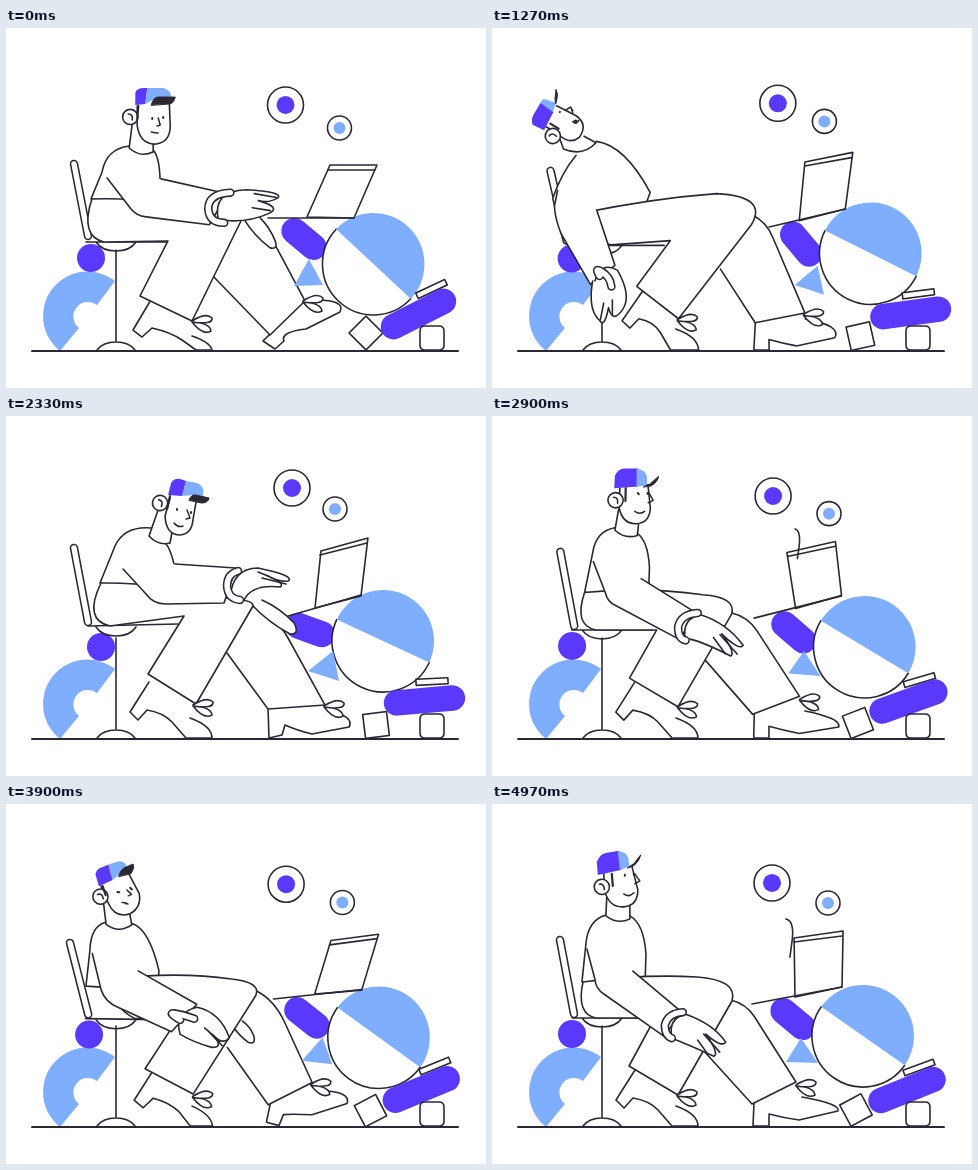
An HTML page with a canvas that plays this animation: 480x360 px, repeating every 5000 ms.

```html
<!DOCTYPE html>
<html lang="en">
<head>
<meta charset="utf-8">
<title>Napping at the laptop</title>
<style>
html, body { margin: 0; width: 100%; height: 100%; overflow: hidden; background: #fff; }
canvas { display: block; }
</style>
</head>
<body>
<canvas id="stage" width="480" height="360"></canvas>
<script>
const ctx = document.getElementById('stage').getContext('2d');
const INK = '#2b2834', PURPLE = '#5a38fc', BLUE = '#80aeff', WHITE = '#fff';
const LOOP = 5000, CYCLE = 2000;

// Phases of the six key poses: reach, type, nod off, wake, fall back, return.
const PHASES = [0, 330, 730, 970, 1470, 1830];
const COUNT = PHASES.length;
const phase = i => PHASES[(i + COUNT) % COUNT] + CYCLE * Math.floor(i / COUNT);

// Smooth periodic interpolation through the key poses.
function tween(poses, t) {
  let i = COUNT - 1;
  while (PHASES[i] > t) i--;
  const at = n => poses[(n + COUNT) % COUNT];
  const span = n => phase(n + 1) - phase(n);
  const h = span(i), u = (t - phase(i)) / h;
  return at(i).map((from, k) => {
    const rate = n => (at(n + 1)[k] - at(n)[k]) / span(n);
    const slope = n => (rate(n - 1) * span(n) + rate(n) * span(n - 1)) / (span(n - 1) + span(n));
    const to = at(i + 1)[k];
    return from + (to - from) * u * u * (3 - 2 * u)
      + h * u * (1 - u) * (slope(i) * (1 - u) - slope(i + 1) * u);
  });
}

function paint(path, { fill, line = INK, width = 1.6 } = {}) {
  if (fill) { ctx.fillStyle = fill; ctx.fill(path); }
  if (line) { ctx.strokeStyle = line; ctx.lineWidth = width; ctx.stroke(path); }
}

const NUMBER = /-?\d+(\.\d+)?/g;

// A path whose points move between six poses.
function morph(keys, ...styles) {
  const poses = keys.map(k => k.match(NUMBER).map(Number));
  return t => {
    const now = tween(poses, t);
    let i = 0;
    const path = new Path2D(keys[0].replace(NUMBER, () => now[i++].toFixed(2) + ' '));
    styles.forEach(style => paint(path, style));
  };
}

// A rigid shape that moves through [x, y, degrees] poses.
function rigid(poses, ...layers) {
  const shapes = layers.map(([d, style]) => [new Path2D(d), style]);
  return t => {
    const [x, y, turn = 0] = tween(poses, t);
    ctx.save();
    ctx.translate(x, y);
    ctx.rotate(turn * Math.PI / 180);
    shapes.forEach(([path, style]) => paint(path, style));
    ctx.restore();
  };
}

const still = (d, style) => { const path = new Path2D(d); return () => paint(path, style); };
const disc = r => `M${r} 0A${r} ${r} 0 1 1 ${-r} 0A${r} ${r} 0 1 1 ${r} 0Z`;
const solid = color => ({ fill: color, line: null });
const pill = (half, color, width) => [`M${-half} 0H${half}`, { line: color, width }];
const OUTLINE = {}, PAPER = { fill: WHITE };
const BAND = [{ width: 8.5 }, { line: WHITE, width: 5.4 }];

const coin = (r, mark, color, poses) =>
  rigid(poses, [disc(r), PAPER], [disc(mark), solid(color)]);
const bow = poses => rigid(poses,
  ['M0 0Q14-9 20-3Q21 4 0 1Q18 2 19 10Q11 15 0 1Z', PAPER]);

const scenery = [
  still('M109 253A44.5 44.5 0 0 0 54 323L73 300A14 14 0 0 1 91 277Z', solid(BLUE)),
  rigid([[85, 230], [95, 231], [81, 230], [80, 230], [80, 231], [82, 231]], [disc(14), solid(PURPLE)]),
  morph(['M68 136L82 208', 'M68 132L82 206', 'M68 136L82 210',
    'M68 136L82 210', 'M54 146L72 214', 'M61 141L82 212'], ...BAND),
  still('M110 222V314M91 322Q97 314 110 314Q123 314 129 322', OUTLINE),
  morph(['M80 214L162 214M90 214Q96 223 110 223Q124 223 130 214',
    'M82 210L172 208M90 211Q96 220 110 220Q124 220 130 211',
    'M80 214L170 214M90 214Q96 223 110 223Q124 223 130 214',
    'M80 214L158 214M90 214Q96 223 110 223Q124 223 130 214',
    'M100 219L183 219M90 219Q96 228 110 228Q124 228 130 219',
    'M80 215L180 217M90 217Q96 226 110 226Q124 226 130 217'], OUTLINE),

  rigid([[298, 211, 40], [304, 214, 20], [305, 220, 43], [301, 215, 40], [313, 217.5, 54], [303.5, 216, 38]],
    pill(12.5, PURPLE, 26)),
  rigid([[367.5, 236, 43], [377, 225, 25], [378, 227, 19], [371, 232, 35], [383.5, 222, 20], [377, 231, 30]],
    ['M51 0A51 51 0 0 1-51 0', PAPER], ['M-51 0A51 51 0 0 1 51 0Z', solid(BLUE)]),
  rigid([[360, 305, -45], [370, 309, -7], [372, 310, 0], [364, 306, -28], [372, 310, 0], [368, 308, -14]],
    ['M-12-12H12V12H-12Z', PAPER]),
  rigid([[425.5, 261, -25], [426, 265.5, -3], [428.5, 266, -5], [427, 263.5, -20], [427, 267, 0], [431, 263, -19]],
    ['M-16-3H16V3H-16Z', PAPER]),
  rigid([[412.5, 286, -27], [418.5, 284.5, -5], [421, 284, -11], [415, 286, -22], [421.5, 284, 0], [417.5, 285, -18]],
    pill(28, PURPLE, 25.5)),
  still('M419 298H433Q438 298 438 303V317Q438 322 433 322H419Q414 322 414 317V303Q414 298 419 298Z', PAPER),

  morph(['M301 189L324 137L371 137L348 190Z', 'M309 192L315 135L362 122L355 180Z',
    'M306 191L278 143L325 121L349 170Z', 'M303 193L302 134L351 127L350 183Z',
    'M311 192L316 136L363 122L356 178Z', 'M314 191L325 136L373 125L361 183Z'], PAPER),
  morph(['M322 142L369 142M262 190L348 190', 'M314 139L361 127M265 205L355 179',
    'M280 147L327 125M270 208L349 171', 'M302 138L350 132M260 200L350 183',
    'M316 140L362 127M287 200L356 178', 'M324 140L372 129M272 199L361 182'], OUTLINE),

  coin(18, 9, PURPLE, [[279.5, 77], [286, 72], [285, 82], [280, 79], [289, 75], [281, 82]]),
  coin(12, 6, BLUE, [[333.5, 100], [329, 93], [339, 93], [336, 99], [332, 90], [338, 97]])
];

const swish = morph(['M329 107Q326 108 327 112L326 113', 'M329 107Q326 108 327 112L326 113',
  'M329 107Q326 108 327 112L326 113', 'M294 115Q303 117 300 138L298 153',
  'M294 115Q303 117 300 138L298 153', 'M294 115Q303 117 300 138L298 153'], OUTLINE);

const REST = 'M143 266L124 296L132 304L141 294Q158 297 166 306L180 322L206 322Q206 310 184 302';

const legs = [
  // Far shoe, far leg, triangle, far hand
  morph(['M268 302L257 313L269 321L278 313Q274 304 300 301L334 284Q340 272 310 272',
    'M262 292L263 322L276 319L279 309Q290 314 306 318L343 311Q349 300 322 295',
    'M263 292L264 322L277 322L277 311Q292 316 308 322L348 322Q350 308 322 300',
    'M262 299L261 322L277 322L277 310Q292 314 307 316L346 307Q349 300 310 293',
    'M264 291L263 322L277 322L277 312Q290 316 304 320L342 314Q350 298 318 292',
    'M262 296L263 322L276 322L277 309Q294 314 310 318L346 311Q349 299 318 297'], PAPER),
  morph(['M236 189Q258 196 272 222L299 273L264 307L207 248',
    'M246 189Q268 198 282 222L319 289L262 293L221 237',
    'M243 197Q264 202 276 222L319 288L263 293L222 238',
    'M239 196Q254 200 262 212L304 278L260 300L211 246',
    'M272 182Q288 192 294 212L320 290L265 291L240 237',
    'M262 186Q276 196 284 216L312 283L261 296L232 240'], PAPER),
  morph(['M303 231L288 258L317 257Z', 'M327 235L302 255L333 265Z', 'M323 238L304 256L336 264Z',
    'M309 234L294 258L326 259Z', 'M337 240L309 256L337 271Z', 'M327 235L302 256L333 263Z'], solid(BLUE)),
  bow([[297, 273], [318, 290], [319, 291], [304, 281], [318, 291], [311, 286]]),
  morph(['M237 190Q248 208 264 220Q272 222 269 213Q264 200 254 190',
    'M247 190Q262 206 284 218Q294 219 288 207Q274 192 256 184',
    'M262 190Q272 205 282 221Q292 222 288 212Q280 200 268 190',
    'M198 220Q204 228 208 232Q214 234 210 228Q206 222 202 220',
    'M206 262Q208 268 214 272Q222 272 223 262Q222 256 216 258',
    'M216 240Q222 248 228 252Q236 254 233 244Q230 238 224 236'], PAPER),
  // Near shoe and leg
  morph(['M146 270L127 302L136 309L146 300Q164 304 176 312L190 322L206 322Q204 314 186 308',
    REST, REST, REST,
    'M154 262L133 291L141 298L150 289Q164 292 170 304L178 322L207 322Q206 308 184 300',
    'M148 264L129 292L138 300L148 290Q162 294 170 304L180 322L207 322Q206 308 186 298'], PAPER),
  morph(['M86 171Q150 169 220 185Q236 187 236 191L186 293L134 268L162 213L98 214Q74 208 86 171',
    'M95 167Q150 166 230 184Q247 184 247 190L190 288L142 258L178 200L104 210Q77 204 95 167',
    'M97 173Q150 171 230 194Q242 194 242 200L186 290L140 262L172 213L106 214Q76 208 97 173',
    'M91 178Q150 170 205 173Q246 176 240 197L186 291L137 262L163 214L104 214Q84 210 91 178',
    'M93 187Q170 170 240 166Q290 168 270 196L187 290L149 257L188 212L132 218Q106 212 93 187',
    'M116 178Q185 166 230 168Q270 172 260 192L188 288L143 262L180 214L150 215Q125 200 116 178'], PAPER),
  bow([[186, 293], [187, 289], [187, 290], [185, 291], [186, 292], [187, 292]])
];

// The hem is tucked behind the near leg.
const torso = [
  morph(['M123 118Q100 121 96 144L85 171L154 182L154 150Q153 128 147 122',
    'M145 112Q118 110 109 130L94 167L165 180L168 148Q164 132 160 128',
    'M144 116Q124 116 116 128L97 173L165 188L168 158Q165 136 160 132',
    'M114 111Q96 116 94 140L90 178L153 182L154 150Q152 120 138 112',
    'M74 138Q62 158 50 183L56 200L150 195L162 178Q126 122 92 121',
    'M84 119Q74 124 75 150L76 190L150 190L153 178Q136 122 111 118'], PAPER),
  morph(['M126 96L123 120Q134 130 147 124L147 114', 'M152 94L143 120Q152 130 164 127L166 116',
    'M154 98L143 122Q150 132 162 132L166 120', 'M115 92L114 112Q126 121 138 115L138 102',
    'M52 122L57 130Q78 138 92 121L76 117', 'M78 103L84 121Q98 130 111 119L107 106'], PAPER)
];

const head = [
  // Face, ear, sideburn
  morph(['M131 78L131 98Q134 117 150 116Q164 114 164 98L163 74',
    'M164 82L159 100Q160 119 174 119Q186 118 187 103L190 86',
    'M166 82L161 102Q160 122 174 122Q184 121 186 110L192 90',
    'M112 70L113 88Q118 104 132 103Q146 102 146 86L140 62',
    'M36 116L52 118Q66 130 75 118Q81 100 64 95L40 92',
    'M70 86L82 100Q92 114 106 106Q116 96 111 84L94 68'], PAPER),
  rigid([[124, 89, 0], [154, 87, 12], [156, 91, 15], [110, 83, -8], [46, 123, -70], [74, 96, -35]],
    [disc(7.6), PAPER], ['M-2-3Q3-3 2 3', OUTLINE]),
  morph(['M132 78L131 91', 'M164 80L161 93', 'M165 82L162 96',
    'M120 70L121 82', 'M37 112L48 114', 'M72 86L78 92'], { width: 2.2 }),
  // Eyes
  morph(['M146 90L146 91M157 89L157 90', 'M171 93L171 94M185 96L185 97',
    'M174 96L178 98M186 99L188 100', 'M133 71L133 72M142 70L142 71',
    'M45 98L46 98M60 96L61 96', 'M87 87L90 87M101 81L104 83'], { width: 2 }),
  // Nose and mouth
  morph(['M152 90L154 97L151 98M145 104Q149 105 152 105', 'M181 94L184 102L180 103M168 107Q172 112 177 110',
    'M187 97L190 106L186 107M167 111Q170 115 176 114', 'M143 70L148 77L143 80M132 90Q137 94 142 89',
    'M50 96L55 89L60 95M63 102Q65 103 67 102', 'M99 84L105 86L102 88M96 95Q99 94 101 97'], { width: 1.5 }),
  t => {
    const [x, y, r] = tween([[149, 105, 0], [172, 109, 0], [172, 113, 0], [137, 91, 0], [65, 102, 3.3], [99, 96, 1.8]], t);
    const mouth = new Path2D();
    mouth.arc(x, y, Math.max(0, r), 0, 7);
    paint(mouth, solid(INK));
  },
  // Cap
  morph(['M129 77L129 65Q130 60 138 60L141 60L139 76', 'M162 79L165 67Q168 62 174 63L180 65L176 80',
    'M162 80L166 70Q169 66 175 67L190 72L185 86', 'M106 71L105 58Q108 50 114 49L127 47L130 66',
    'M37 120L22 118Q18 114 20 108L24 94L40 98', 'M68 87L62 76Q62 70 67 67L75 62L84 77'], solid(PURPLE)),
  morph(['M139 76L141 60L157 60Q165 62 165 70L150 70', 'M176 80L180 65L191 67Q199 70 197 80L188 79',
    'M183 85L188 72L193 73Q199 76 197 82L194 90', 'M128 66L126 47L130 48Q137 50 137 58L138 63',
    'M40 98L24 94L26 88Q29 86 34 86L41 87', 'M84 77L75 62L80 57Q86 53 90 60L92 68'], solid(BLUE)),
  morph(['M145 77Q147 69 152 69L169 69Q167 76 163 76Z', 'M183 84Q185 78 190 79L203 82Q202 87 196 87Z',
    'M187 92Q192 90 195 91L206 88Q207 92 200 93Z', 'M136 64Q140 61 142 60L149 51Q148 57 142 62Z',
    'M40 88Q37 85 37 82L36 75Q41 78 41 84Z', 'M90 70Q91 65 93 62L97 55Q102 55 98 66Z'], { fill: INK, width: 1 })
];

const arm = [
  morph(['M101 150L124 180Q130 188 140 189L203 197L221 166L155 151',
    'M117 153L140 178Q147 188 160 188L218 187L230 152L169 148',
    'M116 150L138 182Q143 189 152 190L222 201L236 168L168 152',
    'M95 145L103 175Q104 185 112 190L172 232L190 208L141 167',
    'M56 170L50 183Q51 195 58 215L76 262L104 243L93 187',
    'M76 150L75 190Q78 205 92 213L138 249L168 224L116 178'], PAPER),
  // Hand, fingers, cuff
  morph(['M212 192Q206 163 240 162Q276 164 272 170Q262 176 252 173Q276 180 262 186Q240 196 212 192',
    'M224 183Q226 152 252 152Q290 160 282 165Q272 166 262 160Q280 168 274 171Q246 168 238 184',
    'M222 196Q220 172 242 170Q262 175 287 208Q284 214 262 188Q276 204 272 209Q248 192 240 194',
    'M180 234Q176 214 194 210Q222 220 234 238Q230 244 214 230Q228 250 222 252Q196 240 180 234',
    'M78 256Q88 236 104 250Q110 280 96 298Q84 316 84 296Q72 316 67 304Q62 292 78 256',
    'M146 256Q140 240 156 232Q170 240 187 278Q182 288 172 270Q176 288 164 283Q150 268 146 256'], PAPER),
  morph(['M248 166L270 170M246 180L264 183', 'M256 162L280 168M252 156L262 160',
    'M254 184L270 206M262 190L280 212', 'M206 236L216 250M212 230L228 248',
    'M80 284L73 304M90 284L84 300', 'M162 264L172 284M168 258L180 282'], OUTLINE),
  morph(['M224 165Q202 166 202 181Q203 195 218 195', 'M232 155Q221 158 221 170Q222 183 234 184',
    'M237 170Q217 170 216 184Q216 197 226 199', 'M191 208Q176 209 173 221Q173 232 180 234',
    'M78 262Q76 247 90 246Q104 247 104 260', 'M138 251Q133 238 143 229Q155 221 166 229'], ...BAND)
];

const ground = still('M26 323H452', { width: 2 });

function draw(t) {
  const run = parts => parts.forEach(part => part(t));
  ctx.lineCap = ctx.lineJoin = 'round';
  ctx.fillStyle = WHITE;
  ctx.fillRect(0, 0, 480, 360);
  run(scenery);
  if (t > 690 && t < 1010) swish(t);
  // The upper body rises briefly before tipping back.
  const u = Math.min(1, Math.max(0, (t - 970) / 500));
  ctx.save();
  ctx.translate(0, -50 * u * (1 - u) ** 3);
  run(torso);
  run(head);
  ctx.restore();
  run(legs);
  run(arm);
  ground();
}

const start = performance.now();
function tick() {
  draw((performance.now() - start) % LOOP % CYCLE);
  requestAnimationFrame(tick);
}
tick();
</script>
</body>
</html>
```
